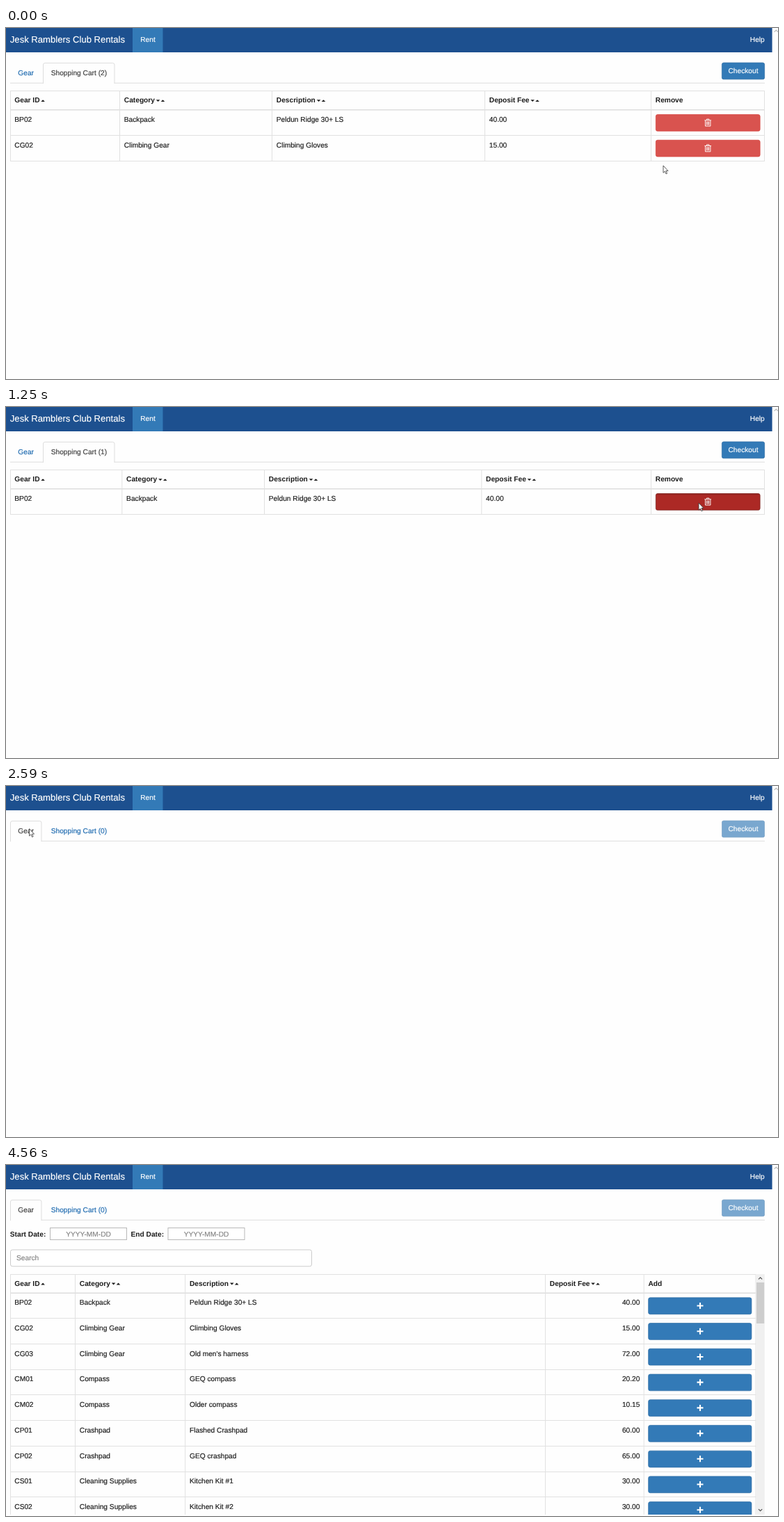
Animation, 1110 px wide and 505 px high, one loop 4.81 s. Source, as an HTML page:

```html
<!DOCTYPE html>
<html lang="en">
<head>
<meta charset="utf-8">
<title>Rental cart</title>
<style>
  html, body { margin: 0; width: 100%; height: 100%; overflow: hidden; background: #fefefe; }
  svg { display: block; width: 1110px; height: 505px; }
  text {
    --ink: #1c1c1c;
    font: 10.2px "Liberation Sans", Arial, sans-serif;
    fill: var(--ink);
    stroke: var(--ink);
    stroke-width: .18px;
    text-rendering: geometricPrecision;
    white-space: pre;
  }
  .bold { font-weight: bold; stroke: none; }
  .brand { font-size: 13.1px; }
  .title { font-size: 17.45px; }
  .white { --ink: #fff; }
  .link { --ink: #1f6bb0; }
  .hover { --ink: #23527c; }
  .tab { --ink: #404040; }
  .hint { --ink: #858585; }
  .mid { text-anchor: middle; }
  .end { text-anchor: end; }
</style>
</head>
<body>
<svg id="stage" viewBox="0 0 1110 505"></svg>
<script>
const LOOP = 4810;
const ROW = 36.72;
const LINE = '#e1e1e1';
const stage = document.getElementById('stage');

const PACK = ['BP02', 'Backpack', 'Peldun Ridge 30+ LS', '40.00'];
const GLOVES = ['CG02', 'Climbing Gear', 'Climbing Gloves', '15.00'];
const GEAR = [
  PACK,
  GLOVES,
  ['CG03', 'Climbing Gear', "Old men's harness", '72.00'],
  ['CM01', 'Compass', 'GEQ compass', '20.20'],
  ['CM02', 'Compass', 'Older compass', '10.15'],
  ['CP01', 'Crashpad', 'Flashed Crashpad', '60.00'],
  ['CP02', 'Crashpad', 'GEQ crashpad', '65.00'],
  ['CS01', 'Cleaning Supplies', 'Kitchen Kit #1', '30.00'],
  ['CS02', 'Cleaning Supplies', 'Kitchen Kit #2', '30.00']
];
const HEADS = ['Gear ID', 'Category', 'Description', 'Deposit Fee'];
const CARET_OFFSETS = [38, 46, 58, 59.5];

const RED = {
  idle: ['#d9534f', '#d43f3a'],
  hover: ['#c9302c', '#ac2925'],
  down: ['#ac2925', '#761c19']
};
const BLUE = { idle: ['#337ab7', '#2e6da4'], hover: ['#286090', '#204d74'] };

// Each cue changes some of the state and holds until the next one.
const CUES = [
  { at: 0, items: 2, view: 'cart', cursor: ['arrow', 945, 198] },
  { at: 120, hot: 1, press: 'hover', cursor: ['arrow', 975, 172] },
  { at: 260, cursor: ['arrow', 982, 170] },
  { at: 400, press: 'down' },
  { at: 640, items: 1, hot: -1 },
  { at: 760, cursor: ['arrow', 990, 152] },
  { at: 880, hot: 0, press: 'hover', cursor: ['arrow', 996, 138] },
  { at: 1250, press: 'down' },
  { at: 1490, items: 0, hot: -1, cursor: ['arrow', 960, 134] },
  { at: 1610, cursor: ['arrow', 430, 92] },
  { at: 1730, cursor: ['arrow', 77, 64] },
  { at: 1850, overGear: true, cursor: ['hand', 42, 63] },
  { at: 1970, cursor: ['hand', 34.5, 62] },
  { at: 2470, view: 'fading', overGear: false, cursor: ['arrow', 33.5, 61.5] },
  { at: 2590, view: 'blank' },
  { at: 2840, view: 'gear' },
  { at: 3840, cursor: ['hand', 77.5, 76] },
  { at: 3960, cursor: ['arrow', 190, 125] },
  { at: 4080, cursor: ['arrow', 480, 245] },
  { at: 4200, cursor: ['arrow', 800, 385] },
  { at: 4320, cursor: ['arrow', 1043, 492] },
  { at: 4440, hot: 8, press: 'hover', cursor: null },
  { at: 4560, hot: -1 }
];

const snap = v => Math.floor(v) + .5;
const text = (x, y, s, cls = '') => `<text x="${x}" y="${y}" class="${cls}">${s}</text>`;
const path = (d, fill = 'none', stroke = 'none', width = 1) =>
  `<path d="${d}" fill="${fill}" stroke="${stroke}" stroke-width="${width}"/>`;
const rect = (x, y, w, h, fill, stroke = 'none', r = 0, width = 1) =>
  `<rect x="${x}" y="${y}" width="${w}" height="${h}" rx="${r}" fill="${fill}" stroke="${stroke}" stroke-width="${width}"/>`;
const hline = (x1, x2, y, color = LINE, width = 1) => path(`M${x1} ${y}H${x2}`, 'none', color, width);
const vline = (x, y1, y2) => path(`M${x} ${y1}V${y2}`, 'none', LINE);
const at = (x, y, content) => `<g transform="translate(${x} ${y})">${content}</g>`;

const button = (x, y, w, [fill, stroke]) => rect(x + .35, y + .35, w - .7, 23.8, fill, stroke, 2.6, .7);
const caretUp = (x, y) => path(`M${x} ${y + 1.5}h5.6l-2.8-2.9z`, '#1c1c1c');
const caretDown = (x, y) => path(`M${x} ${y - 1.4}h5.6l-2.8 2.9z`, '#1c1c1c');
const chevron = (x, y, dir, color) => path(`M${x - 2.6} ${y + 1.4 * dir}l2.6 ${-2.6 * dir} 2.6 ${2.6 * dir}`, 'none', color, 1.2);

const trash = (x, y) => at(x, y,
  path('M-4.8-3.4H4.8M-1.7-3.6V-5.1H1.7V-3.6M-3.7-3V4.9H3.7V-3M-1.6-1.7V3.4M0-1.7V3.4M1.6-1.7V3.4', 'none', '#fff', .95));
const plus = (x, y) => path(`M${x - 4.5} ${y}h9M${x} ${y - 4.5}v9`, 'none', '#fff', 2.1);

const POINTERS = {
  arrow: path('M0 0V10.3l2.3-2.1 1.7 3.7 1.6-.7-1.7-3.6h3.1z', '#fff', '#333', .8),
  hand: path('M-1.1 8.4V1q0-1 1.1-1t1.1 1v4q1.8-.8 2.2.7 1.5-.6 2 .8 1.5-.2 1.5 1.2v2.6q0 1.2-1 2.2v1h-5.4v-1L-4.2 8.2q-.5-1.5 1-1.4z', '#fff', '#333', .85)
};

function navbar() {
  return rect(0, 0, 1101.6, 35, '#1d508f') + rect(182, 0, 43.5, 35, '#337ab7') +
    text(5.8, 20.6, 'Jesk Ramblers Club Rentals', 'brand white') +
    text(193.2, 19.8, 'Rent', 'white') + text(1069.8, 19.8, 'Help', 'white') +
    chevron(1107.3, 4.3, 1, '#b5b5b5');
}

function tabs({ items, view, overGear }) {
  const cart = view === 'cart';
  const [x1, x2] = cart ? [53.5, 156] : [6.5, 51];
  const outline = `M${x1} 80V53q0-2.6 2.6-2.6H${x2 - 2.6}q2.6 0 2.6 2.6V80`;
  const gearClass = overGear ? 'hover' : cart ? 'link' : 'tab';
  return (overGear ? rect(6, 50, 45.3, 29.5, '#eee', 'none', 2.8) : '') +
    hline(6, 1091, 79.2, '#ddd') +
    path(outline, '#fefefe', '#ddd') +
    text(17.3, 68.3, 'Gear', gearClass) +
    text(64.7, 68.3, `Shopping Cart (${items})`, cart ? 'tab' : 'link') +
    `<g opacity="${items ? 1 : .65}">` + button(1029, 49.6, 62, BLUE.idle) +
    text(1060, 65.4, 'Checkout', 'white mid') + '</g>';
}

// Grid lines, headings and row texts shared by both tables.
function table({ top, bottom, right, columns, rows, action, feeX }) {
  const first = top + 27;
  const starts = [6, ...columns];
  const labelX = i => starts[i] + 6.3;
  let out = hline(6, right, snap(top)) + hline(6, right, first + .2, '#ddd', 1.4);
  out += [6.5, ...columns, right - .5].map(x => vline(x, top, bottom)).join('');
  HEADS.forEach((label, i) => {
    const x = labelX(i), caret = x + CARET_OFFSETS[i], y = top + 14;
    out += text(x, top + 16.7, label, 'bold');
    out += i ? caretDown(caret, y) + caretUp(caret + 6.9, y) : caretUp(caret, y);
  });
  out += text(labelX(4), top + 16.7, action, 'bold');
  rows.forEach((row, r) => {
    const y = first + r * ROW;
    row.forEach((value, i) => {
      const fee = i === 3 && feeX;
      out += text(fee || labelX(i), y + 17.2, value, fee ? 'end' : '');
    });
    out += hline(6, right, snap(y + ROW));
  });
  return out;
}

function cartPage({ items, hot, press }) {
  if (!items) return text(5.8, 109.5, 'Empty Shopping Cart', 'title');
  const rows = [PACK, GLOVES].slice(0, items);
  const columns = items === 2 ? [163.5, 382.5, 688.5, 927.5] : [166.8, 371.5, 683.8, 927.5];
  const bottom = 117.6 + items * ROW;
  const buttons = rows.map((_, i) => {
    const mode = i === hot ? press : 'idle';
    const y = 124.2 + i * ROW;
    return button(934, y, 150.5, RED[mode]) +
      (mode === 'down' ? hline(936, 1082.5, y + 1.6, '#0002', 1.6) : '') +
      trash(1009.2, y + 12);
  });
  return table({ top: 90.6, bottom, right: 1091, columns, rows, action: 'Remove' }) + buttons.join('');
}

function dateField(labelX, label, x) {
  return text(labelX, 102.6, label, 'bold') +
    rect(x + .5, 90.5, 110, 17, '#fff', '#b8b8b8') +
    text(x + 55.5, 102.6, 'YYYY-MM-DD', 'hint mid');
}

function gearPage({ hot, press }) {
  const buttons = GEAR.map((_, i) => {
    const y = 190.5 + i * ROW;
    return button(923.3, y, 149, BLUE[i === hot ? press : 'idle']) + plus(998, y + 12);
  });
  const grid = table({
    top: 157, bottom: 503, right: 1078.5, columns: [99.5, 257.7, 775.5, 917.2],
    rows: GEAR, action: 'Add', feeX: 911.4
  });
  return dateField(5.8, 'Start Date:', 63) + dateField(179.5, 'End Date:', 232.5) +
    rect(6.5, 122, 433, 23.8, '#fff', '#ccc', 2.8) + text(15, 137.2, 'Search', 'hint') +
    `<clipPath id="list"><path d="M5 156H1092V503H5z"/></clipPath>` +
    `<g clip-path="url(#list)">${grid}${buttons.join('')}</g>` +
    rect(1078.5, 157, 12.3, 346, '#f0f0f0') + rect(1079, 169, 11.2, 59, '#cdcdcd') +
    chevron(1084.6, 163, 1, '#505050') + chevron(1084.6, 496.5, -1, '#505050');
}

const PAGES = {
  cart: cartPage,
  fading: s => `<g opacity=".5">${cartPage(s)}</g>`,
  blank: () => '',
  gear: gearPage
};

function draw(state) {
  const { cursor, view } = state;
  stage.innerHTML = rect(0, 0, 1110, 505, '#fefefe') + navbar() + tabs(state) + PAGES[view](state) +
    (cursor ? at(cursor[1], cursor[2], POINTERS[cursor[0]]) : '');
}

let shown = -1;
function tick() {
  const time = performance.now() % LOOP;
  const index = CUES.filter(cue => cue.at <= time).length - 1;
  if (index !== shown) {
    shown = index;
    draw(Object.assign({ hot: -1, press: 'idle', overGear: false }, ...CUES.slice(0, index + 1)));
  }
  requestAnimationFrame(tick);
}
tick();
</script>
</body>
</html>
```
